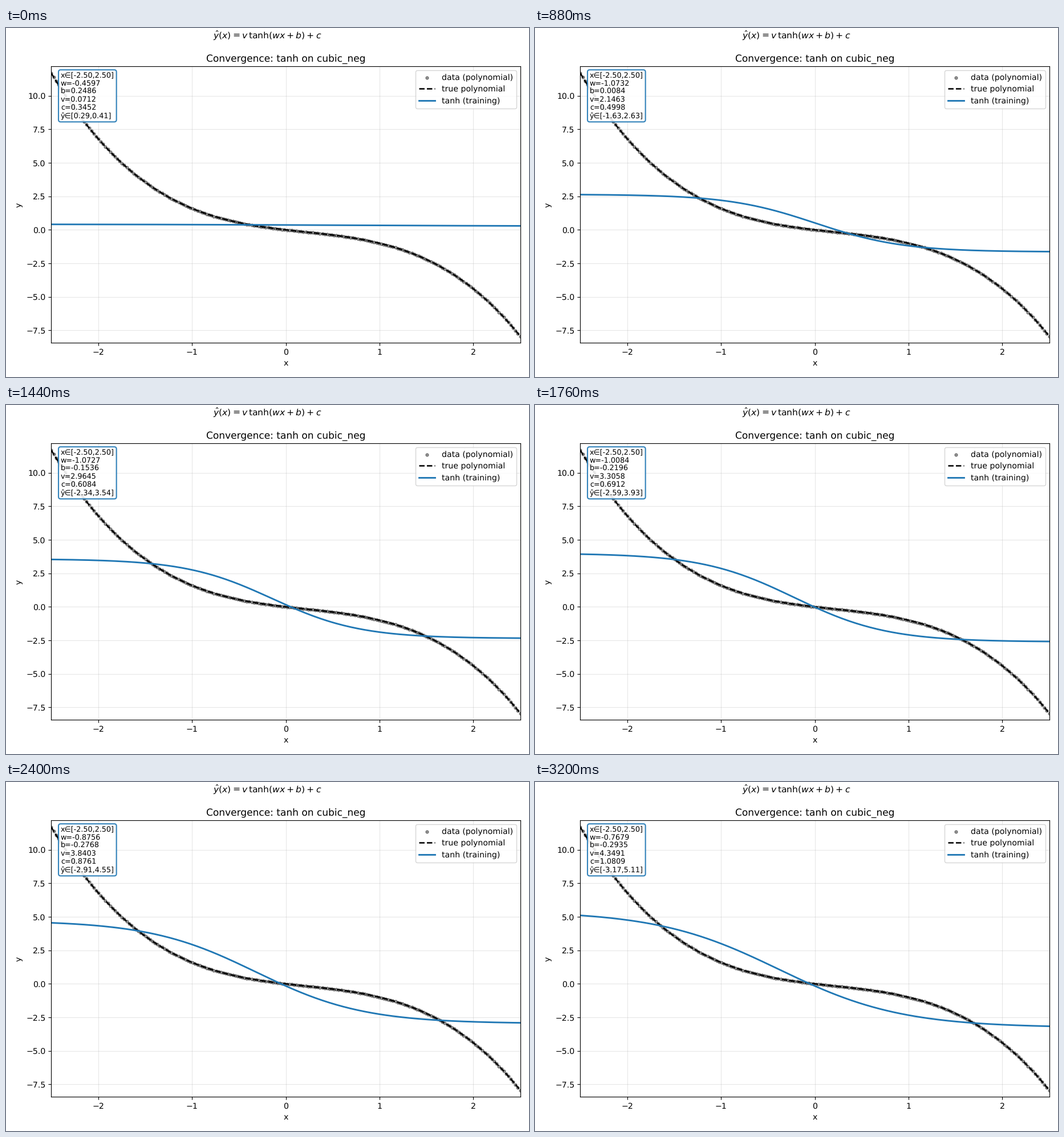
Write a matplotlib script that moves like this. It is 917 px wide and 611 px high and loops after 3.28 s.

```python
import matplotlib.pyplot as plt
import numpy as np
from matplotlib.animation import FuncAnimation

W, H = 917, 611
DPI = W / 9
FRAMES, INTERVAL = 41, 80
RATE, SUBSTEPS = 0.1, 5
START = (-0.4597, 0.2486, 0.0712, 0.3452)  # w, b, v, c
BLUE = "#1f77b4"

plt.rcParams["text.hinting"] = "no_hinting"

x = np.linspace(-2.5, 2.5, 200)
y = -0.5 * x**3 + 0.3 * x**2 - 0.8 * x


def model(params):
    w, b, v, c = params
    return v * np.tanh(w * x + b) + c


def descend(params):
    """One frame's worth of gradient descent on the squared error."""
    p = np.array(params)
    for _ in range(SUBSTEPS):
        w, b, v, c = p
        t = np.tanh(w * x + b)
        err = y - (v * t + c)
        slope = err * v * (1 - t**2)
        grad = [(slope * x).mean(), slope.mean(), (err * t).mean(), err.mean()]
        p = p + RATE / SUBSTEPS * np.array(grad)
    return p


def describe(params, pred):
    rows = [f"x∈[{x.min():.2f},{x.max():.2f}]"]
    rows += [f"{name}={value:.4f}" for name, value in zip("wbvc", params)]
    rows.append(f"ŷ∈[{pred.min():.2f},{pred.max():.2f}]")
    return "\n".join(rows)


history = [np.array(START)]
while len(history) < FRAMES:
    history.append(descend(history[-1]))

fig, ax = plt.subplots(figsize=(9, (H + 1e-6) / DPI), dpi=DPI)
fig.subplots_adjust(left=79.4 / W, right=901.6 / W,
                    bottom=1 - 551.3 / H, top=1 - 67.4 / H)
fig.suptitle(r"$\hat{y}(x)=v\,\tanh(wx+b)+c$", fontsize=11, y=0.996)

ax.scatter(x, y, s=12, color="black", alpha=0.4, label="data (polynomial)")
ax.plot(x, y, "k--", lw=1.8, label="true polynomial")
curve, = ax.plot(x, model(START), color=BLUE, lw=2, label="tanh (training)")
info = ax.text(0.02, 0.98, "", transform=ax.transAxes, fontsize=9,
               ha="left", va="top", linespacing=1.15,
               bbox=dict(boxstyle="round,pad=0.3", facecolor="white",
                         edgecolor=BLUE, linewidth=1.5, alpha=0.9))

ax.set_xlim(-2.5, 2.5)
ax.set_ylim(y.min() - 0.5, y.max() + 0.5)
ax.set_title("Convergence: tanh on cubic_neg")
ax.set_xlabel("x")
ax.set_ylabel("y")
ax.grid(True, alpha=0.3)
ax.legend(loc="upper right")


def update(i):
    pred = model(history[i])
    curve.set_ydata(pred)
    info.set_text(describe(history[i], pred))
    return curve, info


anim = FuncAnimation(fig, update, frames=FRAMES, interval=INTERVAL, repeat=True)
plt.show()
```
